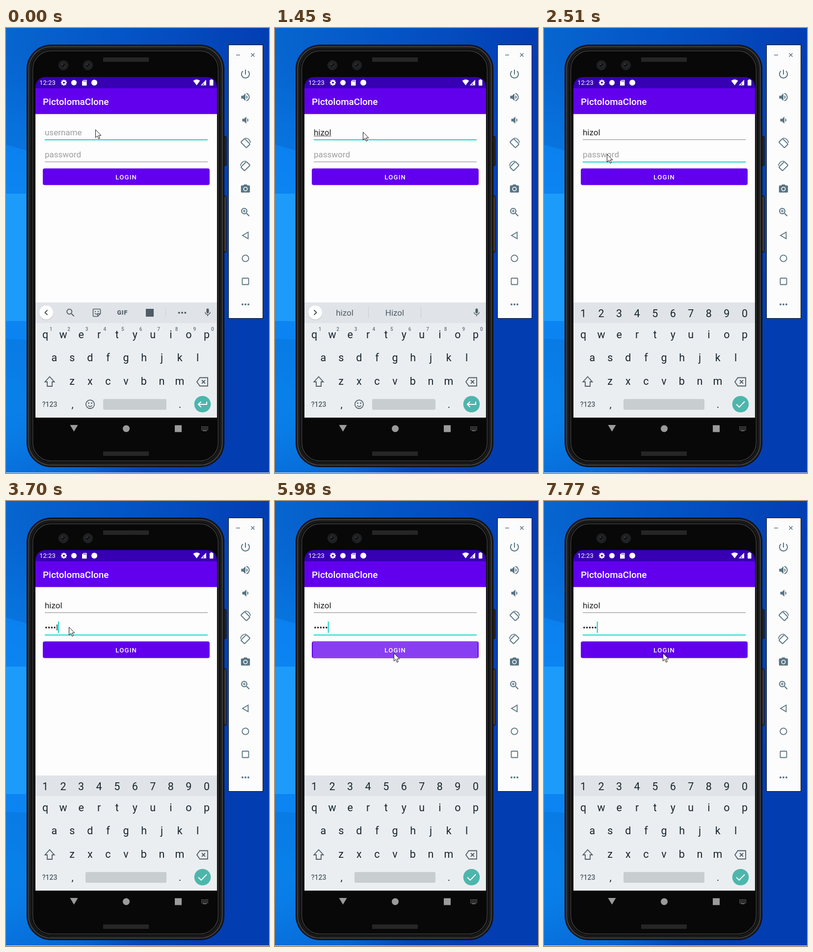
An HTML page with a canvas for the animation above (8 s loop, 536x908 px).

```html
<!DOCTYPE html>
<html lang="en">
<head>
<meta charset="utf-8">
<title>Login screen</title>
<style>
html, body { margin: 0; width: 100%; height: 100%; overflow: hidden; background: #0450c0; }
canvas { display: block; width: 536px; height: 908px; }
</style>
</head>
<body>
<canvas id="stage"></canvas>
<script>
const W = 536, H = 908, LOOP = 8000;
const canvas = document.getElementById('stage');
const c = canvas.getContext('2d');
const dpr = window.devicePixelRatio || 1;
canvas.width = W * dpr;
canvas.height = H * dpr;

const TEAL = '#08d3c2', PURPLE = '#6200ee', INK = '#17242d', GREY = '#4f5c65', SLATE = '#587483';
const USER = 'hizol';

// Timelines: [start ms, value]; the last entry reached holds.
const typedUser = [[0, ''], [310, 'h'], [590, 'hi'], [740, 'hiz'], [860, USER]];
const typedPass = [[0, ''], [2660, 'h'], [2940, '•i'], [3220, '••z'], [3530, '•••o'], [3700, '••••l'], [5280, '•••••']];
const suggestions = [[0, null], [310, ['h', 'H', 'he']], [590, ['hi', 'Hi', 'his']],
  [740, ['hiz', 'Hiz', 'his']], [860, [USER, 'Hizol', '']]];
const caretOn = [[0, 0], [310, 1], [1450, 0], [1960, 1], [2510, 0], [2660, 1], [4280, 0], [4820, 1],
  [5280, 0], [5710, 1], [6220, 0], [6780, 1], [7210, 0], [7770, 1]];
const pointer = [[0, [182, 207]], [1450, [179, 212]], [1570, [161, 230]], [1690, [139, 248]], [1810, [128, 257]],
  [4280, [150, 280]], [4400, [182, 312]], [4550, [230, 313]], [4700, [239, 311]], [4820, [242, 310]]];
const ripple = [[0, 0], [5980, 1], [6100, 0.45], [6220, 0]];

function at(line, t) {
  let value = line[0][1];
  for (const [start, v] of line) if (start <= t) value = v;
  return value;
}

const ICONS = {
  power: 'M13 3h-2v10h2zM17.8 5.2l-1.4 1.4C18 7.9 19 9.8 19 12c0 3.9-3.1 7-7 7s-7-3.1-7-7c0-2.2 1-4.1 2.6-5.4L6.2 5.2C4.2 6.8 3 9.3 3 12c0 5 4 9 9 9s9-4 9-9c0-2.7-1.2-5.2-3.2-6.8z',
  louder: 'M3 9v6h4l5 5V4L7 9zM16.5 12c0-1.8-1-3.3-2.5-4v8c1.5-.7 2.5-2.2 2.5-4zM14 3.2v2.1c2.9.9 5 3.5 5 6.7s-2.1 5.8-5 6.7v2.1c4-.9 7-4.5 7-8.8s-3-7.9-7-8.8z',
  quieter: 'M18.5 12c0-1.8-1-3.3-2.5-4v8c1.5-.7 2.5-2.2 2.5-4zM5 9v6h4l5 5V4L9 9z',
  camera: 'M9 2L7.2 4H4c-1.1 0-2 .9-2 2v12c0 1.1.9 2 2 2h16c1.1 0 2-.9 2-2V6c0-1.1-.9-2-2-2h-3.2L15 2zM7 12a5 5 0 0 1 10 0a5 5 0 0 1-10 0zM8.8 12a3.2 3.2 0 0 1 6.4 0a3.2 3.2 0 0 1-6.4 0z',
  search: 'M15.5 14h-.8l-.3-.3C15.4 12.6 16 11.1 16 9.5a6.5 6.5 0 1 0-6.5 6.5c1.6 0 3.1-.6 4.2-1.6l.3.3v.8l5 5 1.5-1.5zM9.5 14a4.5 4.5 0 1 1 0-9a4.5 4.5 0 0 1 0 9z',
  mic: 'M12 14c1.7 0 3-1.3 3-3V5c0-1.7-1.3-3-3-3S9 3.3 9 5v6c0 1.7 1.3 3 3 3zM17.3 11c0 3-2.5 5.1-5.3 5.1S6.7 14 6.7 11H5c0 3.4 2.7 6.2 6 6.7V21h2v-3.3c3.3-.5 6-3.3 6-6.7z'
};

function rect(x, y, w, h, fill) {
  c.fillStyle = fill;
  c.fillRect(x, y, w, h);
}
function round(x, y, w, h, r, fill, stroke, lw = 1) {
  c.beginPath();
  c.roundRect(x, y, w, h, r);
  if (fill) { c.fillStyle = fill; c.fill(); }
  if (stroke) { c.strokeStyle = stroke; c.lineWidth = lw; c.stroke(); }
}
function disc(x, y, r, fill, stroke, lw = 1) {
  c.beginPath();
  c.arc(x, y, r, 0, 7);
  if (fill) { c.fillStyle = fill; c.fill(); }
  if (stroke) { c.strokeStyle = stroke; c.lineWidth = lw; c.stroke(); }
}
function path(d, fill, stroke, lw = 1) {
  const p = new Path2D(d);
  if (fill) { c.fillStyle = fill; c.fill(p, 'evenodd'); }
  if (stroke) { c.strokeStyle = stroke; c.lineWidth = lw; c.stroke(p); }
}
function icon(name, x, y, size, fill) {
  c.save();
  c.translate(x - size / 2, y - size / 2);
  c.scale(size / 24, size / 24);
  path(ICONS[name], fill);
  c.restore();
}
function text(s, x, y, size, fill, { weight = 400, align = 'left', gap = 0 } = {}) {
  c.font = `${weight} ${size}px Roboto, sans-serif`;
  c.letterSpacing = gap + 'px';
  c.textAlign = align;
  c.fillStyle = fill;
  c.fillText(s, x, y);
  const width = c.measureText(s).width;
  c.letterSpacing = '0px';
  return width;
}
function dots(x, y, step, r, fill) {
  for (let i = -1; i <= 1; i++) disc(x + i * step, y, r, fill);
}

function glow(y, r, strength) {
  const g = c.createRadialGradient(0, y, 40, 0, y, r);
  g.addColorStop(0, `rgba(10,134,238,${strength})`);
  g.addColorStop(0.6, `rgba(8,122,228,${strength * 0.63})`);
  g.addColorStop(1, 'rgba(8,110,220,0)');
  rect(0, 0, 430, H, g);
}

function wallpaper() {
  const base = c.createLinearGradient(0, 0, W, 90);
  base.addColorStop(0, '#0766d0');
  base.addColorStop(0.45, '#0454c6');
  base.addColorStop(1, '#033db2');
  rect(0, 0, W, H, base);
  glow(470, 430, 0.95);
  glow(780, 300, 0.75);
  path('M0 238L42 250V636L0 634z', 'rgba(14,138,250,.6)');
  rect(-219, 338, 260, 260, '#1c9bfb');
  rect(0, 907, W, 1, '#e4ebf4');
}

function speaker(y) {
  rect(198, y, 93, 9, '#242424');
  for (let i = 0; i < 31; i++)
    for (let j = 0; j < 3; j++) rect(199 + i * 3, y + 1 + j * 3, 1, 1, '#343434');
}

function ring(inset, color, lw) {
  round(42 + inset, 34 + inset, 403 - 2 * inset, 862 - 2 * inset, 50 - inset, null, color, lw);
}

function phone() {
  round(443, 221, 6, 60, 2, '#242424', '#0c0c0c');
  round(444, 342, 5, 116, 2, '#342d27', '#14110f');
  rect(446, 345, 1, 110, '#685442');
  round(42, 34, 403, 862, 50, '#080808');
  ring(2.5, '#242424', 2);
  ring(4.5, '#505050', 1.5);
  ring(8, '#191919', 4);
  ring(12.5, '#404040', 1.5);
  for (const x of [117, 167]) {
    disc(x, 76, 9.5, '#1d1e20', '#292a2c');
    disc(x, 76, 5, '#111214', '#36383b');
    disc(x - 2, 74, 1.3, '#4a4c50');
    disc(x + 2, 78, 1, '#404246');
  }
  speaker(60);
  speaker(864);
  const nav = '#9b9b9b';
  path('M130.5 810H146.5L138.5 823.5z', nav);
  disc(245, 817.5, 7, nav);
  rect(344, 810.5, 14, 14, nav);
  for (let j = 0; j < 3; j++)
    for (let i = 0; i < 5; i++) rect(398 + i * 3, 813 + j * 3, 2, 1.5, '#777');
  rect(401, 821, 8, 1.5, '#777');
}

function statusBar() {
  rect(60, 100, 370, 23, '#3700b3');
  const white = '#fff';
  text('12:23', 68, 116.3, 13.2, white);
  for (let i = 0; i < 4; i++) {
    c.save();
    c.translate(118, 111.5);
    c.rotate(i * Math.PI / 4);
    rect(-1.4, -6, 2.8, 12, white);
    c.restore();
  }
  disc(118, 111.5, 4.3, white);
  disc(118, 111.5, 1.9, '#3700b3');
  disc(138.5, 111.5, 5.5, white);
  path('M158 106H164.500V117.500H155V109z', white);
  for (let i = 0; i < 3; i++) rect(158 + i * 2, 107, 1, 2.5, '#3700b3');
  disc(180, 111.5, 6, white);
  path('M381.500 107.500Q388.500 102.500 395.500 107.500L388.500 117z', white);
  path('M408 105.500V117H397z', white);
  path('M403.500 112.500V115.800H400.300z', '#3700b3');
  round(415, 106, 7.5, 11.5, 1, white);
  rect(417, 104.8, 3.5, 2, white);
}

function field(y, active) {
  rect(79, y, 332, active ? 1.9 : 1.2, active ? TEAL : '#949494');
}

function form(t) {
  const onPass = t >= 1960;
  const user = at(typedUser, t), pass = at(typedPass, t);
  const caret = at(caretOn, t), lift = at(ripple, t);
  rect(60, 175, 370, 385, '#fdfdfd');
  rect(60, 123, 370, 52.6, PURPLE);
  text('PictolomaClone', 75, 156.5, 18.9, '#fff', { weight: 500 });

  const userW = text(user || 'username', 79, 219, 17, user ? '#222' : '#9d9d9d');
  if (user && !onPass) rect(79, 220, userW, 1, '#444');
  field(227.2, !onPass);
  const passW = text(pass || 'password', 79, 264.3, 17, pass ? '#222' : '#9d9d9d');
  field(272.5, onPass);
  if (caret) {
    if (onPass) rect(79 + (pass ? passW : 0), 246, 2, 23, TEAL);
    else rect(79 + (user ? userW : 0), 201, 2, 23, TEAL);
  }

  round(75, 286.6, 340, 34, 3.8, PURPLE);
  if (lift) {
    c.globalAlpha = lift;
    rect(77, 286.6, 336, 34, '#883ff2');
    c.globalAlpha = 1;
  }
  text('LOGIN', 223.3, 308.5, 13.2, '#fff', { weight: 500, gap: 1.18 });
}

function keyRow(keys, x, y) {
  [...keys].forEach((k, i) => text(k, x + i * 36.55, y, 21.5, INK, { align: 'center' }));
}

function toolStrip(words) {
  disc(82, 581.3, 14.8, 'rgba(0,0,0,.13)');
  disc(82, 580.5, 14.3, '#fff');
  path(words ? 'M79.500 575.500L84.500 580.500L79.500 585.500' : 'M84.500 575.500L79.500 580.500L84.500 585.500', null, '#414c54', 1.8);
  icon('mic', 411, 580.5, 20, GREY);
  if (words) {
    words.forEach((w, i) => text(w, 142 + i * 102 + (i > 1 ? 6 : 0), 587, 17, GREY, { align: 'center' }));
    rect(190, 569, 1, 23, '#c8cdd1');
    rect(297, 569, 1, 23, '#c8cdd1');
    return;
  }
  icon('search', 131.5, 581, 22, GREY);
  path('M179 573.500H191Q192.500 573.500 192.500 575V583L187 588.500H179Q177.500 588.500 177.500 587V575Q177.500 573.500 179 573.500zM192 583H187V588', null, GREY, 1.6);
  disc(182, 578.5, 1.2, GREY);
  disc(188, 578.5, 1.2, GREY);
  path('M181 582Q184.500 586 188 582', null, GREY, 1.5);
  text('GIF', 226.5, 585, 12.5, GREY, { weight: 900, gap: 0.8 });
  rect(285, 573, 16, 16, GREY);
  rect(325, 570, 1, 21, '#cdd2d6');
  dots(359, 581, 6.3, 2, GREY);
}

function keyboard(t) {
  const secret = t >= 2080;
  rect(60, 560, 370, 42, '#e0e4e8');
  rect(60, 602, 370, 193, '#ebeef1');
  if (secret) keyRow('1234567890', 80, 589.5);
  else toolStrip(at(suggestions, t));

  keyRow('qwertyuiop', 80, 633);
  if (!secret) [...'1234567890'].forEach((d, i) =>
    text(d, 91.5 + i * 36.6, 618, 10, '#66717a', { weight: 500, align: 'center' }));
  keyRow('asdfghjkl', 98.3, 680.3);
  keyRow('zxcvbnm', 134.7, 727.8);

  path('M89 711.500L98.500 722H94V731H84V722H79.500z', null, GREY, 1.8);
  path('M389 722L395 713.500H411V730.500H395zM399 718.500L406 725.500M406 718.500L399 725.500', null, GREY, 1.8);
  text('?123', 89, 772.8, 14, GREY, { weight: 500, align: 'center' });
  text(',', 135.5, 775, 21, INK, { align: 'center' });
  text('.', 354.5, 775, 21, INK, { align: 'center' });
  if (!secret) {
    disc(171.5, 767.8, 8.6, null, GREY, 1.7);
    disc(168.5, 765.5, 1.4, GREY);
    disc(174.5, 765.5, 1.4, GREY);
    path('M167.500 770Q171.500 775 175.500 770', null, GREY, 1.5);
  }
  const left = secret ? 162 : 198;
  round(left, 757, 327 - left, 22, 3, '#c8cdcf');
  disc(400.5, 767.5, 16.8, '#4db6ac');
  path(secret ? 'M392 768L397.800 773.500L409 762' : 'M409 762.500V768H392.500M397.500 762.500L392 768L397.500 773.500', null, '#fff', 2);
}

function rotateIcon(y, dir) {
  c.save();
  c.translate(488, y);
  c.scale(dir, 1);
  c.save();
  c.rotate(Math.PI / 4);
  round(-8, -5.3, 16, 10.6, 1.5, null, SLATE, 2);
  c.restore();
  path('M-1-10.500Q8-10.500 10.500-1', null, SLATE, 1.7);
  c.restore();
}

function toolbar() {
  rect(453, 34, 71, 559, '#05070c');
  rect(454, 35, 69, 557, '#fcfcfc');
  rect(469, 54.5, 8, 1.4, SLATE);
  path('M499.500 51.500L506.500 58.500M506.500 51.500L499.500 58.500', null, SLATE, 1.5);
  icon('power', 488, 94, 24, SLATE);
  icon('louder', 488, 141, 23, SLATE);
  icon('quieter', 488, 188, 22, SLATE);
  rotateIcon(235, 1);
  rotateIcon(282, -1);
  icon('camera', 488, 328.5, 22, SLATE);
  icon('search', 488, 376, 24, SLATE);
  path('M482.500 373.500H488.500M485.500 370.500V376.500', null, SLATE, 1.5);
  path('M493.500 416.500V430L482 423.200z', null, SLATE, 1.8);
  disc(488, 470, 6.7, null, SLATE, 1.8);
  round(481.5, 510.5, 13, 13, 1, null, SLATE, 1.8);
  dots(488, 564, 6, 2, SLATE);
}

function arrow([x, y]) {
  c.save();
  c.translate(x + 0.5, y + 0.5);
  path('M0 0V16L3.700 12.700L6.300 18.500L8.800 17.400L6.200 11.700H11.300z', '#fff', '#111', 1);
  c.restore();
}

function draw(t) {
  c.setTransform(dpr, 0, 0, dpr, 0, 0);
  wallpaper();
  phone();
  c.save();
  c.beginPath();
  c.roundRect(60, 100, 370, 695, [20, 20, 0, 0]);
  c.clip();
  statusBar();
  form(t);
  keyboard(t);
  c.restore();
  toolbar();
  arrow(at(pointer, t));
}

const start = performance.now();
function tick() {
  draw((performance.now() - start) % LOOP);
  requestAnimationFrame(tick);
}
tick();
</script>
</body>
</html>
```
